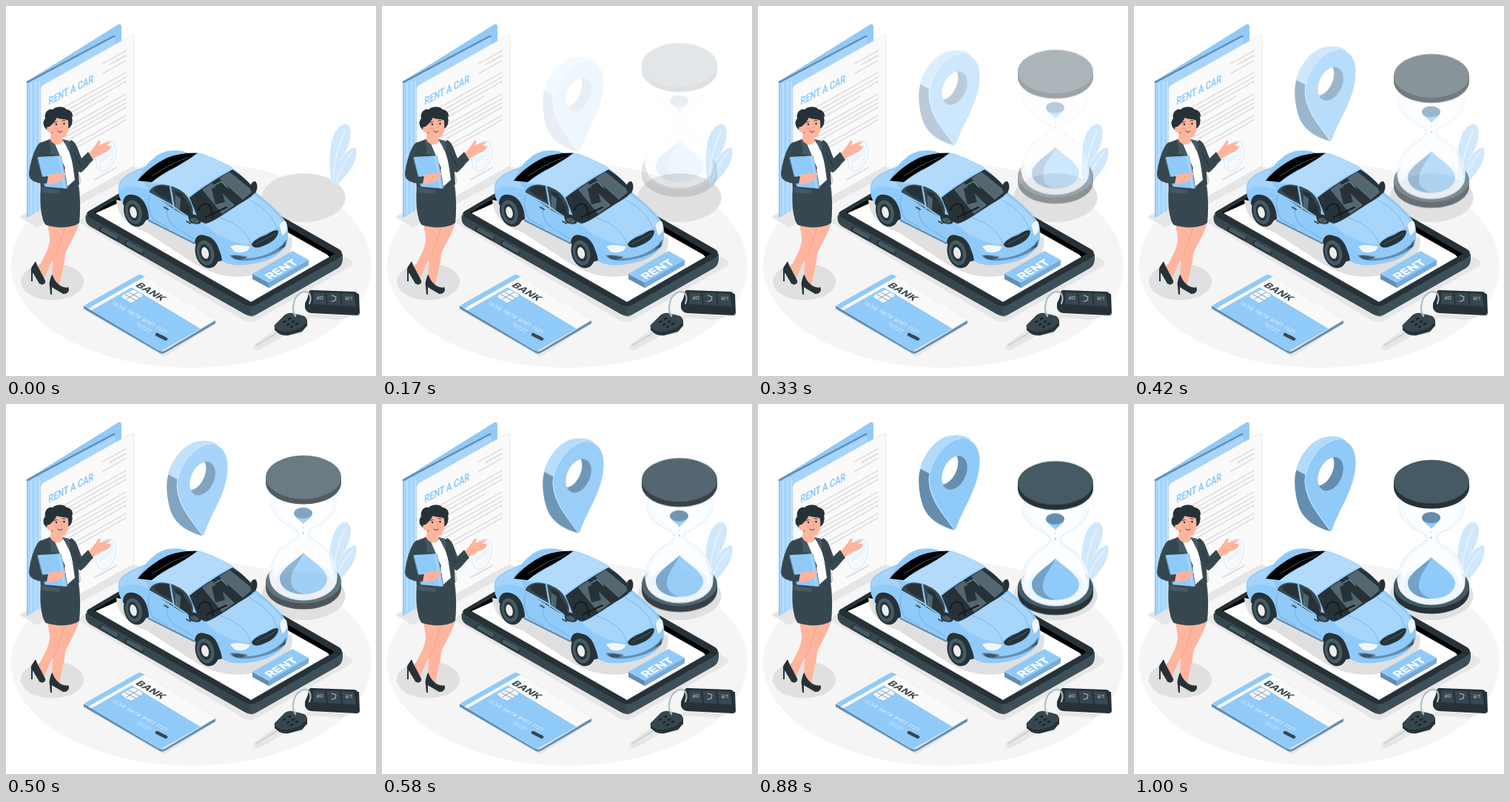
Recreate the animation shown at these times as an HTML page. Size 500 by 500 pixels, loop 1040 ms.

```html
<!DOCTYPE html>
<html lang="en">
<head>
<meta charset="utf-8">
<title>Rent a car</title>
<style>
  html, body { margin: 0; width: 100%; height: 100%; overflow: hidden; background: #fff; }
  svg { display: block; width: 100%; height: 100%; }
  text { font-family: Inter, Roboto, sans-serif; }
  .blue { fill: #90caf9; }
  .pale { fill: #b1dafb; }
  .deep { fill: #648dae; }
  .dark { fill: #37474f; }
  .slate { fill: #455a64; }
  .ink { fill: #263238; }
  .skin { fill: #ffb59d; }
  .shade { fill: #e0e0e0; }
  .line { fill: none; stroke-linecap: round; stroke-linejoin: round; }

  /* Fade in with a vertical slide that overshoots, then a short rest. */
  .drop { animation: enter 1040ms infinite; }
  #pin { --from: 28.6px; }
  #glass { --from: -28.6px; }
  @keyframes enter {
    0%, 7.68% { opacity: 0; transform: translateY(var(--from)); }
    7.69% {
      opacity: .047; transform: translateY(var(--from));
      animation-timing-function: cubic-bezier(.318, .251, .499, 1.353);
    }
    94.5%, 100% { opacity: 1; transform: none; }
  }
</style>
</head>
<body>
<svg viewBox="0 0 500 500">
  <defs>
    <clipPath id="hole"><ellipse cx="265.500" cy="94.500" rx="15.500" ry="24" transform="rotate(25 265.500 94.500)"/></clipPath>
  </defs>

  <!-- floor and shadows -->
  <ellipse cx="250.500" cy="350" rx="243.500" ry="139" fill="#f5f5f5"/>
  <g class="shade">
    <ellipse cx="402" cy="259" rx="56.500" ry="33"/>
    <ellipse cx="62.500" cy="372.500" rx="42.500" ry="25"/>
    <path d="M18 285 150 209 186 222 42 299Z" fill="#e6e6e6"/>
    <path d="M96 291 235 212 465 343Q472 348 465 352L338 425Q330 429 322 425Z" fill="#e6e6e6"/>
    <path d="M105 410 181 372 283 429 214 474Z" fill="#e6e6e6"/>
    <path d="M333 463 372 441 408 434 407 416 478 419 480 414 452 424 410 421 400 443 376 446 340 466Z" fill="#e6e6e6"/>
  </g>

  <!-- leaves -->
  <g fill="#d0e8fc">
    <path d="M441 241C434 214 436 164 458 159.500C470 160 467 185 456 201C447 214 447 229 446 243Z"/>
    <path d="M443 247C443 220 455 193 473 191C477 210 461 229 447 242Z"/>
  </g>
  <path class="line" d="M443 238C442 212 449 187 459 168M446 239C449 222 459 207 469 197" stroke="#fff" stroke-width=".8"/>

  <!-- document -->
  <path class="blue" d="M28 102 150 26Q156 22 156 29V213L28 286Z"/>
  <path class="line" d="M29 103 146 41" stroke="#648dae" stroke-width="3"/>
  <path d="M28 105 144 43Q148 41 148 47V214L28 286Z" fill="#a6d4fb"/>
  <path class="line" d="M34 105V280M40 103V278M45 102V275" stroke="#bde0fc" stroke-width="2"/>
  <path class="line" d="M28.500 104V285" stroke="#83bced"/>
  <path d="M47 112Q47 109 50 107L169 40Q173 38 173 43V216L47 287Z" fill="#fafafa" stroke="#e4e4e4" stroke-width=".8"/>
  <text class="blue" transform="matrix(.8 -.41 0 1.1 57.500 134)" font-size="13.500" font-weight="600" style="font-family:Roboto,sans-serif">RENT A CAR</text>
  <g class="line" stroke="#e0e0e0" stroke-width="2">
    <path d="M131 78 162 60.500M140 79 162 67M131 91 162 73.500"/>
    <path d="M68 143 162 90M68 149 162 96M68 155 162 102M68 162 138 122"/>
    <path d="M68 172 162 119M68 178 162 125M68 184 162 131M68 190 162 137"/>
    <path d="M68 201 162 148M80 200 162 154M119 235 149 218.500"/>
  </g>
  <g class="line" stroke="#e1f0fd" transform="rotate(17 135 203)">
    <ellipse cx="135" cy="203" rx="12.500" ry="21" stroke-width="2"/>
    <ellipse cx="135" cy="203" rx="8.500" ry="16"/>
    <path d="M129 211 141 194M130 214 141 199" stroke-width="1.500"/>
  </g>

  <!-- woman -->
  <g>
    <path class="skin" d="M56 293 81 297C77 319 70 334 60 349L51 369 43 354C52 339 60 324 59 313Z"/>
    <path class="ink" d="M40 345C36 351 33 354 34 358V372L36 372 36 360 45 375C49 378 54 376 53 371L42 350Z"/>
    <path class="skin" d="M68 295 99 292C95 310 85 321 80 335C79 350 75 360 72 379L62 368C64 350 62 335 66 320Z"/>
    <path class="line" d="M79 300C75 318 70 330 64 342" stroke="#f29a83" stroke-width=".8"/>
    <path class="ink" d="M62 363C59 371 58 375 59 379L60 390H62L62 380 77 389C83 390 87 384 84 380C77 382 67 376 63 364Z"/>
    <path class="dark" d="M47 244C45 270 48 290 54 296C70 301 90 300 99 293C101 275 100 252 98 241Z"/>
    <path class="dark" d="M46 185 62 179 80 181 91 184 98 224 99 242 73 250 47 246 44 215Z"/>
    <path d="M62 181C67 188 73 187 77 182L88 199 93 235 83 244 79 220Z" fill="#fff"/>
    <path class="slate" d="M58 181 63 179 80 219 78 224 66 200 60 201 61 195ZM77 180 84 182 94 202 90 204 94 235 88 203Z"/>
    <path class="skin" d="M112 199C117 193 120 190 125 182C128 180 128 184 126 188L140 183C143 185 136 187 136 188L142 190C142 193 138 196 134 198C127 200 123 204 117 207Z"/>
    <path class="dark" d="M87 181C95 183 97 193 102 206L111 197 118 208C112 213 107 222 101 225C94 223 88 208 86 197Z"/>
    <path class="line" d="M92 198 101 216" stroke="#263238" stroke-width=".8"/>
    <path class="dark" d="M47 184C39 188 32 214 31 228C32 238 44 239 57 241L60 231 47 224 52 207Z"/>
    <path class="deep" d="M42 205 73 202 81 247 52 244Z"/>
    <path class="blue" d="M43 204 75 202.500 83 246.500 53 244Z"/>
    <path class="line" d="M72 204 79 245" stroke="#b1dafb" stroke-width="1.500"/>
    <path class="skin" d="M54 232C60 224 70 228 80 225C82 228 77 230 79 232C74 238 62 242 54 240Z"/>
    <path class="dark" d="M36 232 57 230 55 240 43 239Z"/>
    <path class="slate" d="M48 245 72 249 72 254 49 252Z"/>
    <path class="line" d="M99 228 101 238 98 242" stroke="#90a4ae" stroke-width=".7"/>
    <path class="skin" d="M61 166 60 181C64 188 73 190 77 183L75 174Z"/>
    <path class="ink" d="M55 167C50 163 49 156 53 152C51 144 58 138 63 140C67 135 79 135 82 140C88 140 92 147 89 151C91 157 88 164 84 166L62 172Z"/>
    <path class="skin" d="M62 160C66 157 67 153 69 151C75 154 81 152 84 155C85 166 84 174 79 177C73 179 66 178 63 171C55 173 52 162 59 163Z"/>
    <path class="line" d="M65 157.500 69 156.500M76 155 80 155M70 169Q73 172 76 169" stroke="#263238" stroke-width=".9"/>
    <path class="line" d="M73.500 158 75.500 164 73 164.500" stroke="#e98a72" stroke-width=".8"/>
    <circle class="ink" cx="68" cy="160" r="1.300"/><circle class="ink" cx="78.500" cy="159" r="1.300"/>
    <ellipse cx="68" cy="166" rx="3" ry="2" fill="#ff9c84" opacity=".6"/>
  </g>

  <!-- phone -->
  <path class="dark" d="M108 282C107 287 107 294 114 298L322 416Q331 422 340 416L449 354Q456 350 455 335L332 390Z"/>
  <path class="slate" d="M331 407V420Q336 419 340 416L449 354Q456 350 455 337Z" opacity=".5"/>
  <path class="ink" d="M112 277 225 211Q235 206 244 211L449 328Q459 334 449 341L340 403Q331 408 322 403L112 285Q106 281 112 277Z"/>
  <path d="M119 279 230 215 238 215 444 335 331 400Z" fill="#000"/>
  <path d="M121 280 150 267 240 226 434 336 437 339 331 400Z" fill="#fff"/>
  <path class="line" d="M130 302 149 313M164 321 183 332" stroke="#263238" stroke-width="8"/>
  <path class="line" d="M131 302 149 312M165 321 183 331" stroke="#455a64" stroke-width="5.500"/>

  <!-- car -->
  <path class="shade" d="M149 262C151 284 165 298 190 306L256 349C282 365 315 371 342 361C368 354 391 336 386 313L320 290Z"/>
  <path class="blue" d="M152 243C154 232 165 226 188 217C196 208 205 199 218 196C232 194 240 196 247 199L258 198C275 202 300 214 306 219C318 228 332 242 336 250C350 262 367 276 374 286C381 294 383 305 380 318C378 330 360 343 345 346C325 351 308 352 297 347C290 345 288 340 285 332L255 320 192 290 158 268C153 260 151 252 152 243Z"/>
  <path d="M153 243C155 234 168 227 186 219L178 234C192 239 187 244 194 249C181 244 164 239 153 250Z" fill="#a6d4fb"/>
  <path class="ink" d="M158 268C158 255 167 252 178 257C188 262 193 276 193 288L183 292ZM255 320C256 309 264 306 275 313C284 318 291 333 292 344L284 346Z"/>
  <path d="M178 236C186 225 203 212 218 205C233 199 249 198 260 199L254 206C241 212 215 223 197 238Z" fill="#000"/>
  <path class="line" d="M198 229 225 213 247 204" stroke="#37474f" stroke-width="1.200"/>
  <path class="pale" d="M195 240C217 223 244 211 258 199C276 203 300 214 306 220C287 229 262 245 247 258C231 243 211 239 195 240Z"/>
  <path class="dark" d="M194 250C199 241 211 240 222 243C235 247 243 253 247 261C253 270 255 282 250 287C236 282 213 264 194 253Z"/>
  <path class="ink" d="M199 248 207 243 220 244 223 264 208 256ZM228 249 238 254 250 274 250 284 232 275Z"/>
  <path class="line" d="M222 244 227 273M194 253 223 269 250 288" stroke="#90caf9" stroke-width="2"/>
  <path d="M229 255 236 260 235 276 229 272Z" fill="#607d8b" opacity=".7"/>
  <path class="ink" d="M248 259C265 245 290 230 306 221C318 228 332 241 336 249C337 254 330 259 318 266C300 277 282 291 270 294C261 292 258 284 255 276Z"/>
  <path d="M265 248 278 239 309 269 292 281ZM288 233 302 224 334 250 320 262Z" fill="#546770"/>
  <path class="ink" d="M260 259C263 252 269 254 271 260L275 275 263 280ZM278 247C283 243 289 245 292 251L296 265 283 268Z"/>
  <path class="line" d="M260 276C263 265 274 265 277 274L280 285M270 285 298 272" stroke="#111b20" stroke-width="2"/>
  <path class="line" d="M282 242 291 237 299 245" stroke="#78909c" stroke-width="1.300"/>
  <path class="pale" d="M270 295C284 291 300 278 336 256C350 266 364 277 372 289C373 297 365 302 351 307C337 311 333 321 327 323C313 321 296 316 279 304Z" opacity=".75"/>
  <path class="line" d="M290 286C313 295 326 305 331 322M329 262C350 273 362 286 366 302" stroke="#79b5e8"/>
  <path class="line" d="M218 268C215 282 220 292 226 297L253 314M194 256C190 266 193 279 199 288L218 299" stroke="#6fa9da" stroke-width=".9"/>
  <path class="line" d="M214 272 219 275M244 291 249 294" stroke="#37474f" stroke-width="1.800"/>
  <path class="line" d="M193 290 255 321" stroke="#648dae" stroke-width="2"/>
  <g transform="rotate(-14 175 278)">
    <ellipse class="ink" cx="175" cy="277.500" rx="15.500" ry="21"/>
    <ellipse class="slate" cx="172.500" cy="278" rx="11" ry="16.500"/>
    <ellipse class="ink" cx="172" cy="278" rx="7" ry="11.500"/>
    <ellipse cx="172" cy="278" rx="4.500" ry="8" fill="#eee"/>
  </g>
  <g transform="rotate(-14 272 333)">
    <ellipse class="ink" cx="272" cy="332.500" rx="16" ry="22"/>
    <ellipse class="slate" cx="269.500" cy="333" rx="11.500" ry="17"/>
    <ellipse class="ink" cx="269" cy="333" rx="7.500" ry="12"/>
    <ellipse cx="269" cy="333" rx="4.800" ry="8" fill="#eee"/>
  </g>
  <path class="ink" d="M332 322C335 316 344 312 352 309C358 305 365 301 368 304C368 313 359 320 348 324C340 328 333 327 332 322Z"/>
  <path class="line" d="M337 322C345 317 356 314 364 307" stroke="#546770" stroke-width=".8"/>
  <path d="M303 325C310 321 322 324 330 325C328 332 319 335 309 332ZM370 298C371 291 376 288 379 293C381 300 379 308 373 310Z" fill="#f2f7fb"/>
  <path class="deep" d="M302 337C306 335 317 337 325 338C346 337 365 328 380 315L378 324C369 335 348 342 328 344C315 345 306 343 302 337Z"/>
  <path class="ink" d="M305 338C311 336 318 338 324 340C320 344 309 344 305 338ZM367 330 378 319 377 325Z" opacity=".6"/>
  <path class="blue" d="M325 337C345 336 364 327 376 316L374 322C360 334 345 340 326 341Z"/>
  <path class="ink" d="M331 250C329 243 332 236 337 237C341 241 340 249 336 254ZM246 283C254 279 262 283 264 290C264 296 255 296 248 292Z"/>
  <path class="slate" d="M249 287C254 285 260 287 261 292C257 295 252 293 249 290Z"/>

  <!-- rent button -->
  <path class="deep" d="M333 362 355 374 409 343V350L355 381 333 369Z"/>
  <path d="M355 374 409 343V350L355 381Z" fill="#76abd8"/>
  <path class="blue" d="M333 362 387 331 409 343 355 374Z"/>
  <text transform="matrix(.83 -.48 .7 .48 357 370)" font-size="17.500" font-weight="800" fill="#fff">RENT</text>

  <!-- bank card -->
  <path class="deep" d="M105 405 208 466Q212 468 216 465L283 425V429L216 468Q212 471 208 469L105 409Z"/>
  <g transform="matrix(1.03 .62 .76 -.43 105 405)">
    <rect class="blue" width="100" height="100" rx="4"/>
    <path d="M6 0H10V72H100V96Q100 100 96 100H6Z" fill="#fafafa"/>
  </g>
  <path d="M157 391 170 384Q172 383 174 384L184 390Q185 392 183 393L171 400Q169 401 167 400L157 394Q155 392 157 391Z" fill="#f5f5f5"/>
  <path class="line" d="M161 390 176 398M166 387 181 395M163 396 178 387" stroke="#648dae" stroke-width=".8"/>
  <text class="dark" transform="matrix(.86 .5 -.78 .45 174 378)" font-size="14.500" font-weight="700">BANK</text>
  <g fill="#eaf5fe" font-size="8" letter-spacing=".5">
    <text transform="matrix(.87 .48 -.7 .5 142 402)">1234 5678 9101 1121</text>
    <text transform="matrix(.87 .48 -.7 .5 175 431)">12/21</text>
  </g>
  <path class="line" d="M204 444 216 450" stroke="#37474f" stroke-width="4.500"/>

  <!-- keys -->
  <path d="M334 459 364 437 373 443 368 447 362 447 358 451 353 451 350 455 337 463Z" fill="#e6e6e6"/>
  <path class="line" d="M338 459 366 442" stroke="#c4c4c4" stroke-width="1.200"/>
  <path class="ink" d="M363 431 407 424V432L400 440 382 445Q375 446 369 443L363 438Z"/>
  <path class="dark" d="M364 430 376 418Q381 414 388 415L403 419Q408 422 406 427L398 435 381 440Q374 441 368 438L364 435Q361 433 364 430Z"/>
  <path class="line" d="M375 427 377 426M382 423 384 422M380 431 382 430M387 427 389 426M385 434 387 433M392 430 394 429" stroke="#1b2529" stroke-width="2.600"/>
  <path class="ink" d="M404 402 409 391 477 389 478 414Q478 418 473 418L412 415Q406 414 404 408Z"/>
  <path class="ink" d="M409 387Q410 383 415 384L469 386Q475 386 476 391L477 408Q477 413 472 413L413 410Q406 410 406 404Z"/>
  <path class="dark" d="M415 387 431 387.500 433 404 415 403ZM433 387.500 451 388 453 405 435 404ZM453 388 470 389 473 406 455 405Z"/>
  <g fill="#cfd8dc" font-size="6.500">
    <text transform="translate(429 392) rotate(182)">Off</text>
    <text transform="translate(468 393) rotate(182)">Lift</text>
  </g>
  <path class="line" d="M440 391 446 393 445 398 440 399" stroke="#cfd8dc" stroke-width=".9"/>
  <path class="line" d="M391 419C384 407 390 389 402 386C412 385 413 395 410 402" stroke="#b0bec5" stroke-width="2.200"/>
  <path class="line" d="M392 417C387 407 392 391 403 387" stroke="#eceff1" stroke-width=".8"/>

  <!-- location pin -->
  <g id="pin" class="drop">
    <path class="deep" d="M220 88C215 98 217 125 224 142C231 158 247 167 265 172L262 120 240 95Z"/>
    <path class="pale" d="M219 89C225 66 243 45 263 44C275 43 282 45 287 50L255 72 234 97Z"/>
    <path class="blue" d="M265 172C254 155 232 134 231 107C231 78 254 49 276 48C294 49 302 65 299 88C295 120 277 142 268 169Q267 172 265 172Z"/>
    <g clip-path="url(#hole)">
      <path class="deep" d="M240 65H290V125H240Z"/>
      <ellipse cx="253" cy="88" rx="15.500" ry="24" transform="rotate(25 253 88)" fill="#fff"/>
    </g>
    <path class="line" d="M231 104C233 132 252 152 265 171M231 104C232 78 254 50 274 48" stroke="#d6ebfd" stroke-width=".9"/>
  </g>

  <!-- hourglass -->
  <g id="glass" class="drop">
    <path class="ink" d="M351 245V254C351 271 374 283.500 402 283.500S453 271 453 254V245Z"/>
    <ellipse class="slate" cx="402" cy="246" rx="51" ry="29.500"/>
    <ellipse cx="402" cy="242" rx="45.500" ry="29.500" fill="#e4f1fc"/>
    <path d="M357 130C356 151 369 165 387 173C397 178 397 184 388 190C367 201 355 220 356 240C358 278 446 278 447 240C449 220 437 201 416 190C407 184 407 178 417 173C435 165 448 151 447 130Z" fill="#f4f9fe" opacity=".82"/>
    <path d="M364 140C367 155 380 165 391 170C402 177 402 185 392 192C373 204 363 220 363 240C364 271 440 271 441 240C441 220 431 204 412 192C402 185 402 177 413 170C424 165 437 155 440 140Z" fill="#fff" opacity=".75"/>
    <ellipse cx="402" cy="242" rx="38" ry="23" fill="#edf6fe"/>
    <path class="blue" d="M402 207C409 215 433 229 434 241C434 255 420 263 402 263S370 255 370 241C371 229 395 215 402 207Z"/>
    <path class="deep" d="M402 207C395 215 371 229 370 241C370 255 384 263 402 263C391 260 384 253 385 243C386 229 398 218 402 207Z" opacity=".65"/>
    <path class="blue" d="M389 154C391 162 400 164 402 169C404 164 412 162 414 154Z"/>
    <ellipse class="deep" cx="401.500" cy="153.500" rx="12.500" ry="7.500"/>
    <circle class="blue" cx="402" cy="180.500" r="1.300"/><circle class="blue" cx="402" cy="173" r=".8"/>
    <path class="line" d="M357 139C359 156 373 167 387 173C397 178 397 184 388 190C367 201 355 220 356 240M447 139C445 156 431 167 417 173C407 178 407 184 416 190C437 201 449 220 447 240" stroke="#dcedfc" stroke-width="1.200"/>
    <path class="line" d="M437 148C432 160 424 165 414 170M432 211C439 220 442 231 441 244M363 230C366 214 376 204 388 196" stroke="#fff" stroke-width="3"/>
    <path class="ink" d="M351 105V112C351 129 374 141.500 402 141.500S453 129 453 112V105Z"/>
    <ellipse class="slate" cx="402" cy="105" rx="51" ry="29.500"/>
  </g>
</svg>
</body>
</html>
```
